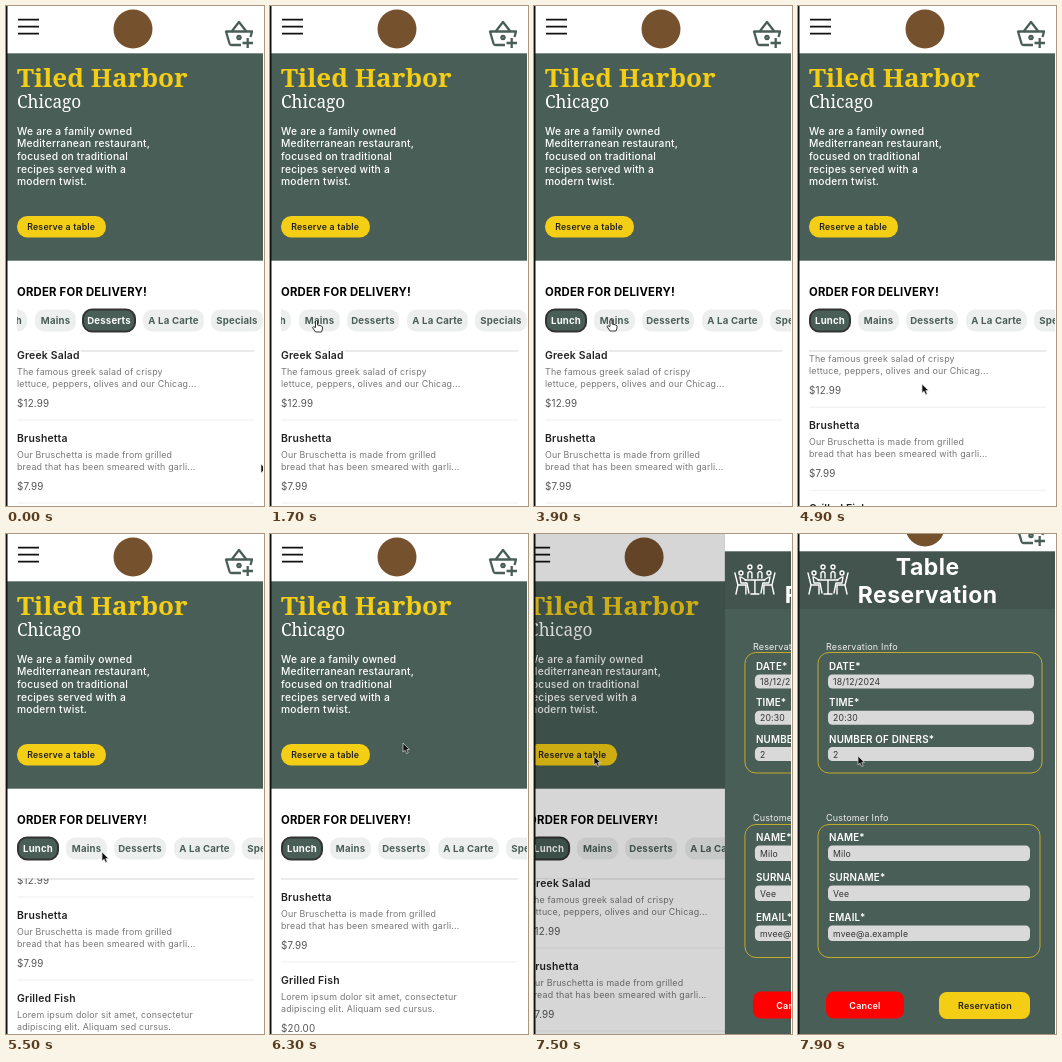
Write an HTML page that moves like this. It is 258 by 500 pixels and loops after 8000 ms.

```html
<!DOCTYPE html>
<html lang="en">
<head>
<meta charset="utf-8">
<title>Restaurant ordering</title>
<style>
  html, body { margin: 0; height: 100%; overflow: hidden; background: #fff; }
  svg { display: block; width: 100%; height: 100%; }
  text { font-family: Inter, Roboto, sans-serif; letter-spacing: .02em; white-space: pre; }
  .serif { font-family: "Noto Serif", serif; letter-spacing: 0; }
  .dish { paint-order: stroke; stroke: #fff; stroke-width: 4px; }
</style>
</head>
<body>
<svg id="stage" viewBox="0 0 258 500" preserveAspectRatio="none">
  <defs>
    <clipPath id="chipClip"><rect x="11" y="300" width="246" height="30"/></clipPath>
    <clipPath id="listClip"><rect x="0" y="344.5" width="258" height="156"/></clipPath>
    <g id="topBar">
      <rect width="258" height="47.300" fill="#fff"/>
      <path d="M12 13.700H33M12 20.700H33M12 27.700H33" stroke="#111" stroke-width="1.700"/>
      <circle cx="127" cy="23" r="19.5" fill="#76512d"/>
      <g fill="none" stroke="#495E57" stroke-width="2.300" stroke-linejoin="round">
        <path d="M235 39H225.500Q224 39 223.500 37.500L220 25.500H246L244.500 31M226 25L233 16L240 25M236.500 37H247M241.700 32V42"/>
        <circle cx="233" cy="31.500" r="1.600"/>
      </g>
    </g>
    <g id="diners" fill="none" stroke="#fff" stroke-width="1.400" stroke-linecap="round" stroke-linejoin="round">
      <path d="M10 39L13 51H21V60M13 51L11 60M50 39L47 51H39V60M47 51L49 60M20 46H40M30 46V60M26 60H34"/>
      <path d="M15 43L16 49H22L24 59M45 43L44 49H38L36 59M16 43L21 46M44 43L39 46M23 44V39Q25 36 27 39V44M33 44V39Q35 36 37 39V44"/>
      <circle cx="16" cy="39" r="2"/><circle cx="44" cy="39" r="2"/>
      <circle cx="25" cy="33" r="2"/><circle cx="35" cy="33" r="2"/>
    </g>
  </defs>
  <g id="home"></g>
  <rect id="shade" width="258" height="500"/>
  <g id="booking"></g>
  <path id="arrow" d="M0 0V9L2.100 7.200L3.600 10.500L5.200 9.800L3.800 6.600H6.500Z" fill="#111" stroke="#ddd" stroke-width=".7"/>
  <path id="hand" d="M-1 0Q0-1 1 0V4L5 5Q6.500 5.500 6 8L5 11H-1L-4 6.500Q-3.500 5-1 6.500Z" fill="#fff" stroke="#222" stroke-width=".9"/>
  <rect width="1.500" height="500" fill="#111"/>
  <rect x="257" width="1" height="500" fill="#fff"/>
</svg>
<script>
const GREEN = '#495E57', YELLOW = '#F4CE14', INK = '#222';
const $ = id => document.getElementById(id);

function add(parent, tag, attrs, content = '') {
  const node = document.createElementNS('http://www.w3.org/2000/svg', tag);
  for (const key in attrs) node.setAttribute(key, attrs[key]);
  node.textContent = content;
  return parent.appendChild(node);
}
const box = (parent, x, y, width, height, fill, rx = 0, more = {}) =>
  add(parent, 'rect', { x, y, width, height, fill, rx, ...more });
const label = (parent, x, y, content, size, weight, fill, more = {}) =>
  add(parent, 'text', { x, y, 'font-size': size, 'font-weight': weight, fill, ...more }, content);
const centred = { 'text-anchor': 'middle' };

// Home screen
const home = $('home');
box(home, 0, 0, 258, 500, '#fff');
box(home, 0, 47, 258, 207.7, GREEN);
add(home, 'use', { href: '#topBar' });
label(home, 11, 80.5, 'Tiled Harbor', 26, 600, YELLOW, { class: 'serif' });
label(home, 11, 102, 'Chicago', 17.2, 400, '#fff', { class: 'serif' });
['We are a family owned', 'Mediterranean restaurant,', 'focused on traditional',
 'recipes served with a', 'modern twist.'].forEach((line, i) =>
  label(home, 11, 128.7 + 12.6 * i, line, 10.25, 500, '#fff'));
box(home, 11, 210, 89, 21.5, YELLOW, 10.5);
label(home, 55.2, 224, 'Reserve a table', 8.8, 600, INK, centred);
label(home, 11, 290, 'ORDER FOR DELIVERY!', 11.3, 700, '#000');

const chipRow = add(add(home, 'g', { 'clip-path': 'url(#chipClip)' }), 'g', {});
const chips = {};
for (const [name, x, width] of [['Lunch', 12, 40], ['Mains', 60, 41], ['Desserts', 108, 52],
                                ['A La Carte', 168, 61], ['Specials', 236, 52]]) {
  chips[name] = {
    pill: box(chipRow, x, 303.5, width, 22, '', 9, { 'stroke-width': 2 }),
    text: label(chipRow, x + width / 2, 317.7, name, 9.6, 700, '', centred)
  };
}

box(home, 11, 344.5, 237, 1, '#d5d5d5');
const list = add(add(home, 'g', { 'clip-path': 'url(#listClip)' }), 'g', {});
[['Greek Salad', 'The famous greek salad of crispy', 'lettuce, peppers, olives and our Chicag...', '$12.99'],
 ['Brushetta', 'Our Bruschetta is made from grilled', 'bread that has been smeared with garli...', '$7.99'],
 ['Grilled Fish', 'Lorem ipsum dolor sit amet, consectetur', 'adipiscing elit. Aliquam sed cursus.', '$20.00']
].forEach(([dish, first, second, price], i) => {
  const y = 83 * i;
  label(list, 11, y + 352.7, dish, 10.4, 600, INK, { class: 'dish' });
  label(list, 11, y + 369, first, 8.9, 400, '#777');
  label(list, 11, y + 380.7, second, 8.9, 400, '#777');
  label(list, 11, y + 400.5, price, 9.8, 400, '#555');
  box(list, 11, y + 413.5, 237, 1, '#f0f0f0');
});

// Reservation screen
const booking = $('booking');
box(booking, 0, 0, 258, 500, GREEN);
box(booking, 0, 17, 258, 58, '#43534d');
add(booking, 'use', { href: '#topBar', y: -30 });
add(booking, 'use', { href: '#diners' });
label(booking, 129.7, 41, 'Table', 23, 700, '#fff', centred);
label(booking, 129.7, 69, 'Reservation', 23, 700, '#fff', centred);

function fieldset(title, titleY, top, width, height, inputWidth, inputHeight, fields) {
  label(booking, 28, titleY, title, 9, 400, '#eee');
  box(booking, 20, top, width, height, 'none', 11, { stroke: '#c3ab2a' });
  for (const [name, value, y] of fields) {
    label(booking, 31, y, name, 9.8, 600, '#fff');
    box(booking, 30, y + 4.5, inputWidth, inputHeight, '#d9d9d9', 4.5);
    label(booking, 35, y + 8 + inputHeight / 2, value, 8.7, 400, '#333');
  }
}
fieldset('Reservation Info', 115.5, 118.5, 224, 120.5, 206, 14,
  [['DATE*', '18/12/2024', 136], ['TIME*', '20:30', 172.3], ['NUMBER OF DINERS*', '2', 208.6]]);
fieldset('Customer Info', 286.5, 290.5, 222, 133, 202, 15.5,
  [['NAME*', 'Milo', 307], ['SURNAME*', 'Vee', 347], ['EMAIL*', 'mvee@a.example', 387]]);
box(booking, 28, 457.5, 78, 27, '#f00', 8);
label(booking, 67, 474.8, 'Cancel', 9, 600, '#fff', centred);
box(booking, 141, 458, 91, 27, YELLOW, 8);
label(booking, 187, 475.3, 'Reservation', 9, 600, INK, centred);

// Tracks hold [time, ...values]; values between keys are linear.
const cursorTrack = [[0, 255, 458], [300, 215, 410], [700, 118, 325], [1100, 98, 314], [1500, 47, 315],
  [1900, 46, 315], [2500, 50, 315], [2900, 82, 315], [3300, 36, 315], [3500, 36, 315], [3900, 77, 314],
  [4300, 120, 365], [4700, 126, 384], [4900, 124, 378], [5500, 96, 318], [5900, 106, 292],
  [6300, 133, 209], [6900, 64, 220], [7100, 60, 222], [8000, 60, 222]];
const chipTrack = [[0, -31], [2500, -31], [2900, 0], [8000, 0]];
const listTrack = [[0, 0], [4700, 0], [5500, -51], [6100, -69], [7200, -69], [7201, 0], [8000, 0]];
const slideTrack = [[0, 0], [7300, 0], [7500, .26], [7700, .9], [7900, 1], [8000, 1]];

function sample(track, t) {
  const i = Math.max(1, track.findIndex(key => key[0] >= t));
  const [from, to] = [track[i - 1], track[i]];
  const k = (t - from[0]) / (to[0] - from[0]);
  return from.slice(1).map((value, n) => value + (to[n + 1] - value) * k);
}
const move = (node, x, y = 0) => node.setAttribute('transform', `translate(${x} ${y})`);

function draw(t) {
  const selected = t < 900 ? 'Desserts' : t < 3300 ? '' : 'Lunch';
  for (const name in chips) {
    const on = name === selected, { pill, text } = chips[name];
    pill.setAttribute('fill', on ? GREEN : '#edefee');
    pill.setAttribute('stroke', on ? '#333' : 'none');
    text.setAttribute('fill', on ? '#fff' : GREEN);
  }
  move(chipRow, sample(chipTrack, t)[0]);
  move(list, 0, sample(listTrack, t)[0]);

  const [slide] = sample(slideTrack, t);
  move(home, -65 * slide);
  move(booking, 258 * (1 - slide));
  $('shade').setAttribute('opacity', Math.min(.16, slide * .62));

  const [x, y] = sample(cursorTrack, t);
  const pointing = t >= 700 && t < 4100 || t >= 6900 && t < 7500;
  move($('arrow'), x, y);
  move($('hand'), x, y);
  $('arrow').setAttribute('visibility', pointing ? 'hidden' : 'visible');
  $('hand').setAttribute('visibility', pointing ? 'visible' : 'hidden');
}

// The screen refreshes every 200 ms, offset by 100 ms.
function tick() {
  const t = performance.now() % 8000;
  draw(t < 100 ? 0 : Math.floor((t - 100) / 200) * 200 + 100);
  requestAnimationFrame(tick);
}
tick();
</script>
</body>
</html>
```
